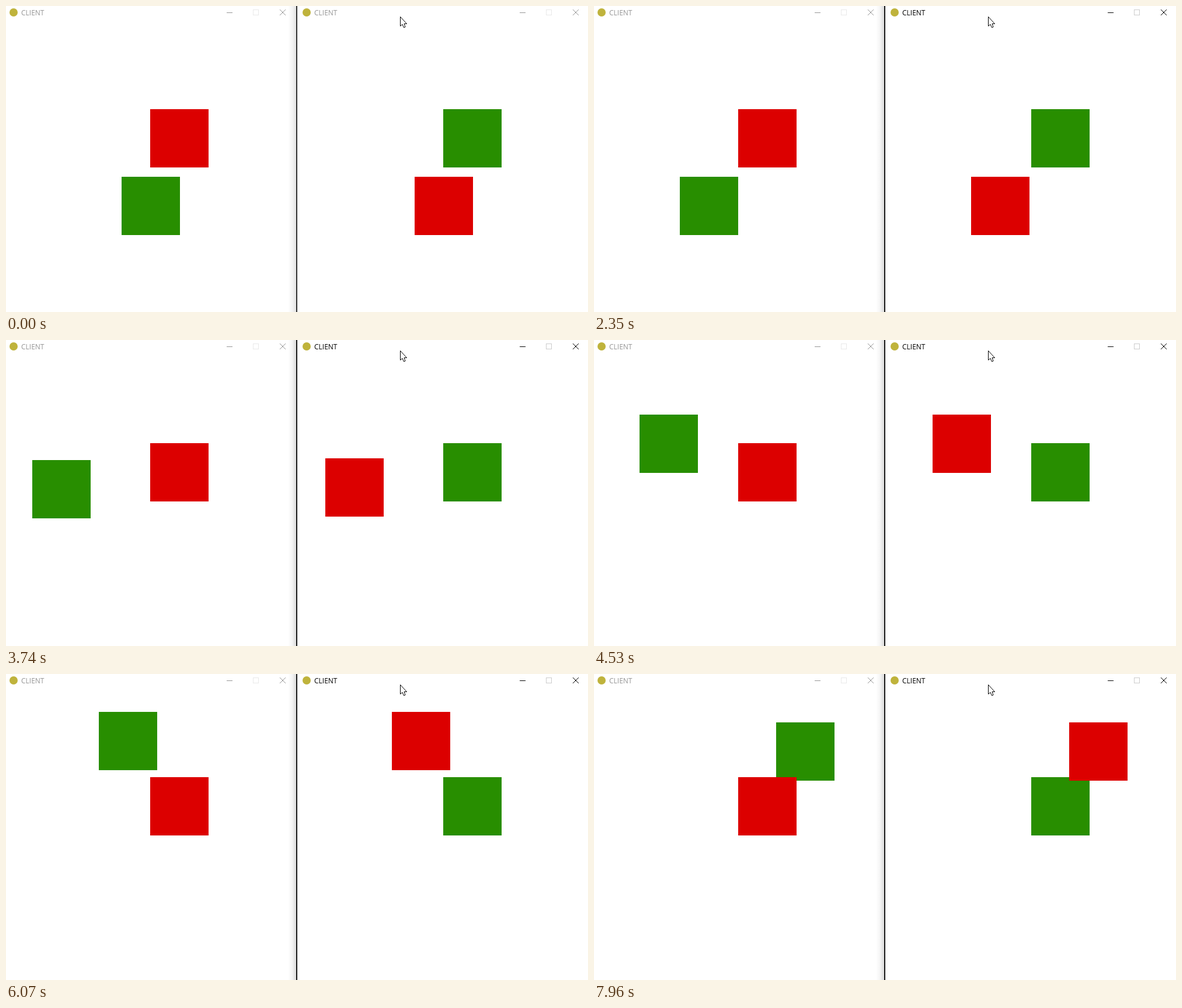
An HTML page with a canvas that plays this animation: 997 px wide and 525 px high, repeating every 8 s.

```html
<!DOCTYPE html>
<html lang="en">
<head>
<meta charset="utf-8">
<title>Two clients</title>
<style>
  html, body { margin: 0; width: 100%; height: 100%; overflow: hidden; background: #fff; }
  canvas { display: block; }
</style>
</head>
<body>
<canvas id="stage" width="997" height="525"></canvas>
<script>
const LOOP = 8000, WINDOW = 502;
const RED = '#dc0000', GREEN = '#288e00';
const ctx = document.getElementById('stage').getContext('2d');

// The game moves SPEED pixels per TICK; the screen is refreshed every REFRESH ms.
const TICK = 33, SPEED = 3, REFRESH = 77.2, FIRST = 1738;
const DELAY = 5; // ms until the other client learns the position

// Held arrow keys: direction, when pressed and for how many ticks.
const keys = [
  { dx: -1, dy: 0, from: 1684, ticks: 51 },
  { dx: 0, dy: -1, from: 2676, ticks: 76 },
  { dx: 1, dy: 0, from: 3650, ticks: 11 },
  { dx: 1, dy: 0, from: 5160, ticks: 78 },
  { dx: 0, dy: 1, from: 7710, ticks: 6 },
];

const clamp = (v, lo, hi) => Math.min(hi, Math.max(lo, v));

function playerAt(t) {
  let x = 198, y = 293;
  for (const { dx, dy, from, ticks } of keys) {
    const moved = SPEED * clamp(Math.floor((t - from) / TICK), 0, ticks);
    x += dx * moved;
    y += dy * moved;
  }
  return { x, y };
}

function rect(color, x, y, w, h) {
  ctx.fillStyle = color;
  ctx.fillRect(x, y, w, h);
}

const square = (color, x, y) => rect(color, x, y, 100, 100);

function trace(points) {
  ctx.beginPath();
  points.forEach(([x, y]) => ctx.lineTo(x, y));
}

const gray = v => `rgb(${v},${v},${v})`;
const mix = (a, b, k) => gray(Math.round(a + (b - a) * k));

function titleBar(left, active) {
  const ink = mix(150, 0, active);
  ctx.save();
  ctx.translate(left, 0);
  ctx.fillStyle = '#bfb33c';
  ctx.beginPath();
  ctx.arc(13, 11, 7, 0, Math.PI * 2);
  ctx.fill();
  ctx.fillStyle = ink;
  ctx.font = '12px "Open Sans", "Noto Sans", sans-serif';
  ctx.fillText('CLIENT', 26, 16);
  rect(ink, 378, 11, 10, 1);
  ctx.strokeStyle = mix(233, 204, active);
  ctx.strokeRect(423.5, 6.5, 9, 9);
  ctx.strokeStyle = ink;
  for (const side of [-5, 5]) {
    trace([[474 - side, 6], [474 + side, 16]]);
    ctx.stroke();
  }
  ctx.restore();
}

function divider(active) {
  const shadow = ctx.createLinearGradient(483, 0, 497, 0);
  shadow.addColorStop(0, '#fff');
  shadow.addColorStop(0.5, '#f5f5f5');
  shadow.addColorStop(1, mix(226, 218, active));
  rect(shadow, 483, 0, 14, 525);
  rect(mix(48, 24, active), 497, 0, 2, 525);
}

function cursor() {
  ctx.save();
  ctx.translate(675.5, 18.5);
  trace([[0, 0], [0, 16], [3.5, 13], [6, 18.5], [8.5, 17.5], [6.5, 12], [11, 12]]);
  ctx.closePath();
  ctx.fillStyle = '#fff';
  ctx.fill();
  ctx.strokeStyle = '#000';
  ctx.stroke();
  ctx.restore();
}

function draw(t) {
  const now = FIRST + Math.floor((t - FIRST) / REFRESH) * REFRESH;
  const active = clamp(Math.floor((t - 70) / 80), 0, 3) / 3;
  const own = playerAt(now), seen = playerAt(now - DELAY);

  rect('#fff', 0, 0, 997, 525);
  divider(active);
  titleBar(0, 0);
  titleBar(WINDOW, active);

  square(GREEN, seen.x, seen.y);
  square(RED, 247, 177);
  square(GREEN, 247 + WINDOW, 177);
  square(RED, own.x + WINDOW, own.y);
  cursor();
}

const start = performance.now();
function frame() {
  draw((performance.now() - start) % LOOP);
  requestAnimationFrame(frame);
}
frame();
</script>
</body>
</html>
```
